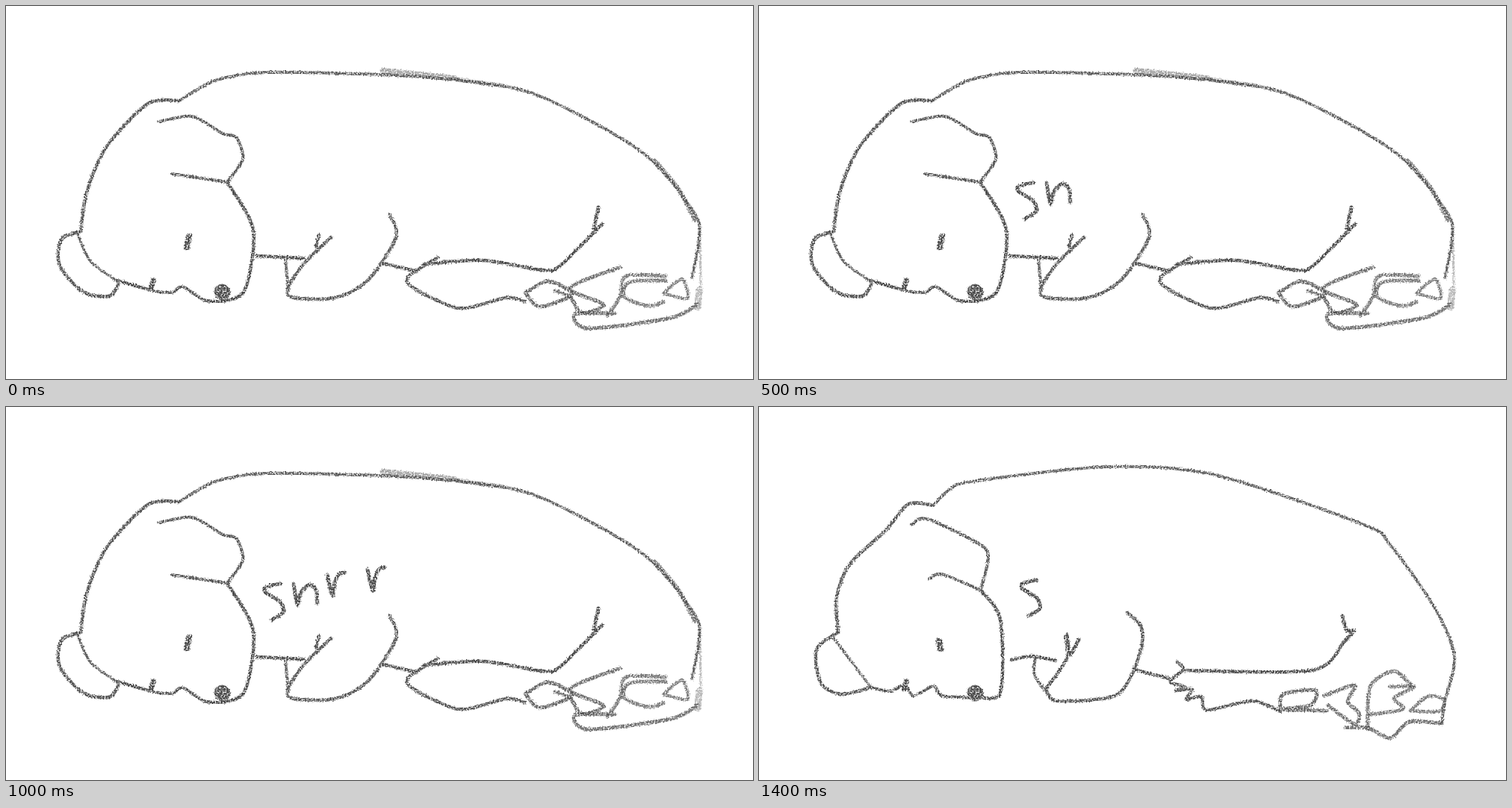
Animation, 1000 px wide and 500 px high, one loop 1500 ms. Source, as an HTML page:

```html
<!DOCTYPE html>
<html lang="en">
<head>
<meta charset="utf-8">
<title>Sleeping bear</title>
<style>
html, body { margin: 0; width: 100%; height: 100%; overflow: hidden; background: #fff; }
svg { display: block; width: 100%; height: 100%; }
path { fill: none; stroke: #404040; stroke-linecap: round; stroke-linejoin: round; }
</style>
</head>
<body>
<svg id="stage" viewBox="0 0 1000 500">
  <filter id="pencil" filterUnits="userSpaceOnUse" x="0" y="0" width="1000" height="500" color-interpolation-filters="sRGB">
    <feTurbulence type="fractalNoise" baseFrequency=".5" numOctaves="2" seed="4" result="noise"/>
    <feDisplacementMap in="SourceGraphic" in2="noise" scale="4" xChannelSelector="R" yChannelSelector="G" result="rough"/>
    <feColorMatrix in="noise" values="0 0 0 0 0  0 0 0 0 0  0 0 0 0 0  0 0 0 3 -.75" result="grain"/>
    <feComposite in="rough" in2="grain" operator="in"/>
  </filter>
</svg>
<script>
const stage = document.getElementById('stage');
const make = (tag, parent, attrs) => {
  const el = document.createElementNS('http://www.w3.org/2000/svg', tag);
  for (const k in attrs) el.setAttribute(k, attrs[k]);
  return parent.appendChild(el);
};

const poses = Array.from({ length: 5 }, () => make('g', stage, { filter: 'url(#pencil)' }));
const mid = (a, b, k = .5) => a.map((v, i) => v + (b[i] - v) * k);
const parse = text => text.split(' ').map(p => p.split(',').map(Number));

// Point at fraction f of a point list
function pointAt(pts, f) {
  const x = f * (pts.length - 1), i = Math.floor(x);
  return mid(pts[i], pts[Math.min(i + 1, pts.length - 1)], x - i);
}

function blend(a, b) {
  const n = Math.max(a.length, b.length, 2);
  return Array.from({ length: n }, (_, i) => mid(pointAt(a, i / (n - 1)), pointAt(b, i / (n - 1))));
}

// Smooth curve through the points
function curve(pts) {
  let d = `M${pts[0]}`;
  if (pts.length < 2) return d + 'l0,0';
  const at = i => pts[Math.max(0, Math.min(pts.length - 1, i))];
  const tangent = i => at(i + 1).map((v, j) => (v - at(i - 1)[j]) / 7);
  for (let i = 1; i < pts.length; i++) {
    const c1 = at(i - 1).map((v, j) => v + tangent(i - 1)[j]);
    const c2 = at(i).map((v, j) => v - tangent(i)[j]);
    d += `C${c1} ${c2} ${at(i)}`;
  }
  return d;
}

const stroke = (pose, pts, width, opacity) =>
  make('path', poses[pose], { d: curve(pts), 'stroke-width': width, 'stroke-opacity': opacity });

// One pencil line in four poses; '=' repeats the pose before, '' leaves it out.
// The remaining pose lies halfway between the last two.
function part(width, opacity, ...texts) {
  const shapes = [];
  for (const t of texts) shapes.push(t === '=' ? shapes.at(-1) : t && parse(t));
  const [a, b, c, d] = shapes;
  [a, b, c, c && d && blend(c, d), d].forEach((pts, i) => pts && stroke(i, pts, width, opacity));
}
const fixed = (width, text) => part(width, 1, text, '=', '=', '=');

// Letters come first in each pose so they can be switched by index
const shifts = [[0, -2], [0, 0], [-4, 3], [1, -1], [5, -7]];
function letter(text, dx = 0, dy = 0) {
  shifts.forEach(([x, y], i) =>
    stroke(i, parse(text).map(p => [p[0] + x + dx, p[1] + y + dy]), 5, 1));
}
const r = '430,227 437,255 440,237 446,226 453,224';
letter('367,239 349,243 347,250 367,263 371,277 356,287');
letter('385,239 390,267 395,250 407,240 415,248 417,265');
letter(r);
letter(r, 54, -7);

// Head
part(4.5, .95,
  '232,127 190,131 135,188 108,250 100,302',
  '247,122 225,132 192,133 140,195 107,243 100,303',
  '248,120 232,135 202,133 182,142 122,214 103,255 98,303',
  '233,132 200,130 170,165 122,210 104,255 106,302');
part(4.5, .95,
  '100,302 74,313 72,348 103,383 138,389 150,374',
  '100,305 74,320 82,370 122,392 153,375',
  '98,304 70,330 83,373 112,390 150,375',
  '106,302 77,325 83,370 110,385 150,376');
part(3.5, .9, '95,303 113,342 151,370', '=', '=', '98,307 150,376');
part(4, 1,
  '150,368 195,381 222,384 236,376 265,394 290,396',
  '153,374 178,382 215,385 236,379 265,395 290,398',
  '150,374 185,381 215,385 235,378 250,389 285,394',
  '150,376 175,381 195,373 207,387 234,374 245,387 290,390');
part(4.5, 1,
  '296,236 331,300 320,380 290,396',
  '300,236 328,285 322,375 290,397',
  '294,240 328,288 320,378 285,393',
  '296,245 323,285 323,383 290,388');
fixed(21, '289,383 290,384');
fixed(7, '194,378 197,368');
part(8.5, 1, '245,309 242,323', '=', '241,314 243,324', '=');
part(4, .95,
  '205,155 250,148 290,171 308,176 317,205 296,236',
  '213,154 262,155 310,181 317,210 300,236',
  '205,159 217,152 270,165 306,186 304,239',
  '205,157 225,150 292,182 307,200 297,246');
part(4, .95, '222,225 296,236', '=', '224,232 245,229 300,240', '228,230 245,224 295,245');

// Back
part(4, .9,
  '232,127 280,100 347,89 500,92 620,101 715,121 850,195 920,275 928,310 918,365',
  '247,122 252,110 337,93 380,98 450,89 590,99 690,121 780,155 820,185 880,220 932,300 929,385 920,403',
  '232,135 248,119 290,104 410,92 455,95 475,87 610,81 695,102 830,183 890,243 925,320 927,390 912,408',
  '233,132 255,111 285,100 465,80 610,91 810,158 845,185 905,270 931,335 918,395 914,424');
part(8, .5, '505,87 600,97');
part(6, .35, '600,98 665,107');
part(5.5, .7, '868,207 900,245 922,287');
part(3, .4, '929,295 930,375');
part(9, .4, '928,380 926,404');

// Front paw
part(4.5, 1, '336,335 398,338', '343,338 396,341', '329,336 350,344 400,345', '338,339 365,334 397,340');
part(4, .9, '374,339 378,382', '=', '372,345 381,380', '370,335 369,360 392,391');
part(4.5, .95,
  '435,310 395,350 378,388 440,391 485,367 522,310 514,280',
  '434,313 380,382 400,394 460,386 502,342 517,290 509,285',
  '376,375 390,394 467,388 502,342 521,300 508,286',
  '385,380 400,394 480,385 510,330 512,295 493,276');
part(4.5, 1, '419,307 415,322', '=', '413,308 415,325 380,380', '412,305 413,335 385,377');
part(5, 1, '', '', '430,320 415,328', '428,312 416,332 411,308');
part(4.5, 1, '505,345 550,356', '=', '=', '503,352 553,365');

// Hind leg
part(4.5, .95,
  '578,337 536,368 582,397 615,405 670,391 695,396',
  '575,338 542,373 560,377 585,400 620,406 660,394 698,409',
  '573,338 543,365 545,385 550,374 570,378 565,384 593,390 590,404 665,398 697,413',
  '560,342 568,352 550,368 570,375 558,380 580,378 572,392 592,388 600,406 660,394 698,408');
part(4.5, 1,
  '560,346 640,341 718,354 742,348 798,292',
  '558,350 725,356 745,352 798,296',
  '553,356 742,357 783,312',
  '568,353 740,353 783,315');
part(5, 1, '793,270 787,298', '=', '783,278 785,302 797,302 780,320', '781,280 787,300 796,300 783,315');

// Toes and sole
part(5, .85,
  '695,385 725,369 758,386 715,403 695,385',
  '698,408 700,378 730,368 757,390 715,404',
  '697,413 700,374 730,372 758,395 700,404',
  '698,405 702,385 745,380 738,400 700,405 760,407');
part(5, .8,
  '822,350 755,378 800,400 770,411 755,390 735,382',
  '797,362 768,372 799,397 795,416 770,410',
  '763,402 770,374 798,372 790,400 810,415 765,427',
  '757,387 797,373 788,395 803,410 797,425 762,400');
part(5, .75,
  '883,362 830,362 822,390 805,415',
  '882,360 832,362 820,400 795,418',
  '885,368 840,362 823,380 818,432',
  '875,375 850,354 818,375 815,432');
part(5, .75,
  '883,368 835,370 828,390 860,402 880,397',
  '882,366 848,372 858,392 885,399',
  '885,368 848,378 850,395 835,410',
  '845,375 877,375 850,390 862,405 818,412');
part(4.5, .75,
  '880,385 905,366 912,392 880,385',
  '882,390 905,374 905,397 882,390',
  '860,390 885,397 907,382 895,408 850,395',
  '872,407 895,388 917,392 910,408 872,407');
part(5, .8,
  '815,412 762,413 780,432 890,418 925,400',
  '770,429 850,435 910,408',
  '768,429 868,436 912,408',
  '785,430 815,430 845,444 870,422 914,424');

let shown = -1;
function draw() {
  const step = Math.floor(performance.now() % 1500 / 100);
  if (step !== shown) {
    shown = step;
    // Letters appear one by one, then leave in reverse
    const letters = Math.min(step - 3, 15 - step);
    poses.forEach((g, i) => g.setAttribute('display', i === step % 5 ? 'inline' : 'none'));
    const paths = poses[step % 5].children;
    for (let i = 0; i < 4; i++) paths[i].setAttribute('display', i < letters ? 'inline' : 'none');
  }
  requestAnimationFrame(draw);
}
draw();
</script>
</body>
</html>
```
